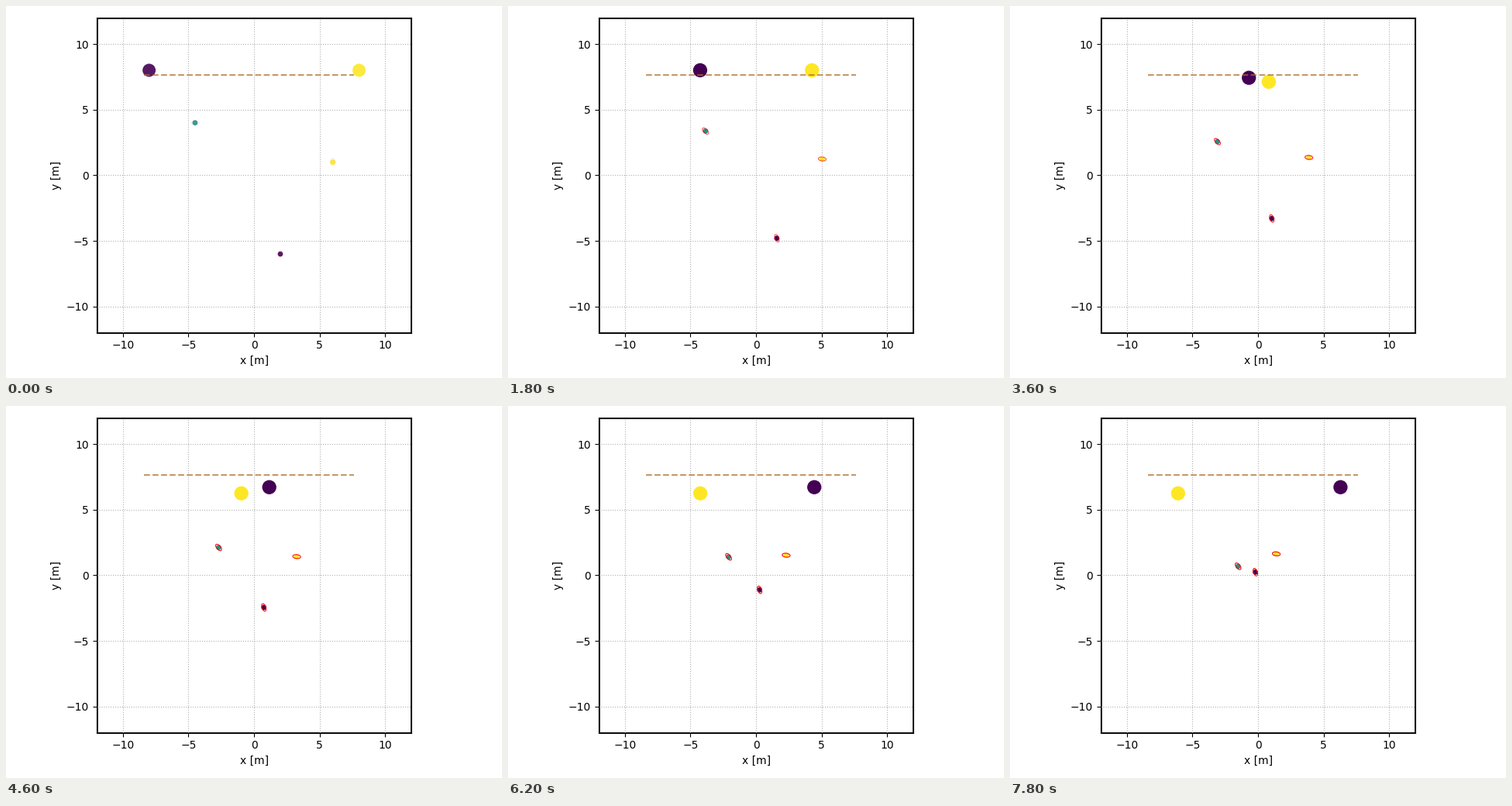
Animation of 640 by 480 pixels, one loop 8000 ms. Source, as a matplotlib script:

```python
import numpy as np
import matplotlib.pyplot as plt
from matplotlib.animation import FuncAnimation
from matplotlib.patches import Circle, Ellipse, Rectangle

W, H, DPI = 640, 480, 100
FRAMES, INTERVAL = 40, 200
PURPLE, TEAL, YELLOW = "#440154", "#21918c", "#fde725"

# Walkers: colour, start, first kick, cruise velocity, slow bend (metres, frames)
LAG = 2
WALKERS = [
    (TEAL, (-4.5, 4), (0.02, 0), (0.091, -0.0896), (-0.0003, 0)),
    (YELLOW, (6, 1), (0, 0.15), (-0.1395, 0.013), (0.0004, 0)),
    (PURPLE, (2, -6), (0, 0.02), (-0.0597, 0.168), (0, 0)),
]

# Robots: colour, start, direction, first step of the dodge, dodge angle
ROBOTS = [
    (PURPLE, (-8, 8), 1, 14, 21.1),
    (YELLOW, (8, 8), -1, 13, 26.2),
]
CRUISE, DODGE = 0.4154, 0.398
DODGE_END, BRAKE_START, BRAKE = 23, 30, 0.893


def walk(n, start, kick, vel, bend):
    """Position and heading of a walker that eases up to cruise speed."""
    start, kick, vel, bend = map(np.array, (start, kick, vel, bend))
    fade = np.exp(-n / LAG)
    s = n - LAG * (1 - fade)
    pos = start + kick * (1 - fade) + vel * s + bend * s**2
    dx, dy = kick * fade / LAG + (vel + 2 * bend * s) * (1 - fade)
    return pos, np.degrees(np.arctan2(dy, dx))


def drive(start, direction, dodge_start, angle):
    """All positions of a robot: cruise, sidestep, cruise, brake."""
    path = [np.array(start, float)]
    a = np.radians(angle)
    for n in range(FRAMES - 1):
        if dodge_start <= n < DODGE_END:
            step = DODGE * np.array([direction * np.cos(a), -np.sin(a)])
        else:
            slow = BRAKE ** max(0, n - BRAKE_START + 1)
            step = CRUISE * slow * np.array([direction, 0])
        path.append(path[-1] + step)
    return path


fig = plt.figure(figsize=(W / DPI, H / DPI), dpi=DPI, facecolor="white")
ax = fig.add_axes([116.9 / W, 58.4 / H, 406.4 / W, 406.4 / H])
ax.set(xlim=(-12, 12), ylim=(-12, 12), xlabel="x [m]", ylabel="y [m]")
ax.set_xticks(range(-10, 11, 5))
ax.set_yticks(range(-10, 11, 5))
ax.grid(linestyle=":")
ax.add_patch(Rectangle((-12, -12), 24, 24, fc="none", ec="black", lw=2))
ax.plot([-8.4, 7.62], [7.64, 7.64], "--", lw=1.5, color="#ae6c27", alpha=0.7)

paths = [drive(*spec) for _, *spec in ROBOTS]
robots = [ax.add_patch(Circle((0, 0), 0.5, fc=c, ec="none")) for c, *_ in ROBOTS]
heads, bodies = [], []
for color, *_ in WALKERS:
    heads.append(ax.add_patch(Circle((0, 0), 0.2, fc=color, ec="none")))
    bodies.append(ax.add_patch(Ellipse((0, 0), 0.6, 0.3, fc="none", lw=0.8)))


def update(n):
    solid = 1 - 0.1 ** (n + 1)
    for disc, path in zip(robots, paths):
        disc.center = path[n]
        disc.set_radius(0.54 - 0.04 * 0.5**n)
        disc.set_alpha(solid)
    # Body outlines grow stronger as the walk goes on
    edge = (1, 0, 0, 1 - 0.9 ** (n + 1))
    for head, body, (_, *spec) in zip(heads, bodies, WALKERS):
        pos, heading = walk(n, *spec)
        head.center = pos
        head.set_alpha(solid)
        body.set_center(pos)
        body.set_angle(heading)
        body.set_edgecolor(edge)
    return robots + heads + bodies


anim = FuncAnimation(fig, update, frames=FRAMES, interval=INTERVAL,
                     init_func=lambda: update(0), repeat=True, repeat_delay=0)
plt.show()
```
